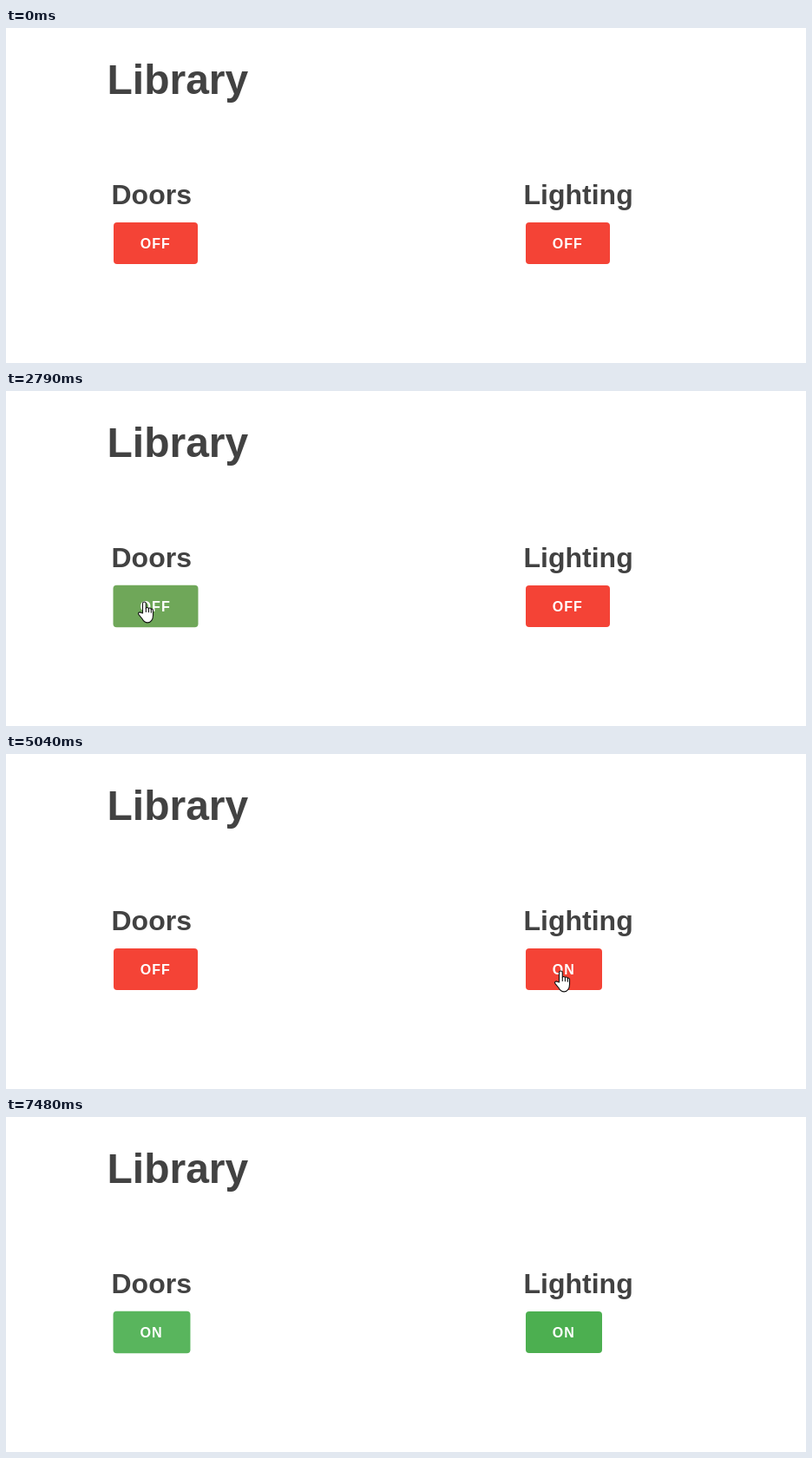
These frames come from a looping animation (922x386 px, 7.56 s). An HTML page:

```html
<!DOCTYPE html>
<html lang="en">
<head>
<meta charset="utf-8">
<title>Library</title>
<style>
  html, body { margin: 0; width: 100%; height: 100%; overflow: hidden; background: #fff; }
  svg { display: block; width: 922px; height: 386px; }
  text { font-family: "Liberation Sans", Arial, sans-serif; font-weight: bold; fill: #424242; }
  .title { font-size: 48px; }
  .heading { font-size: 32px; }
  .label { font-size: 16px; letter-spacing: 1px; fill: #fff; }
  .cursor { fill: #fff; stroke: #111; stroke-width: 1.1; stroke-linejoin: round; stroke-linecap: round; }
</style>
</head>
<body>
<svg viewBox="0 0 922 386">
  <text class="title" x="116.5" y="76">Library</text>
  <text class="heading" x="121.5" y="203">Doors</text>
  <text class="heading" x="596.5" y="203">Lighting</text>
  <g id="doors"><rect x="124" y="224" height="48" rx="4"/><text class="label" x="154.7" y="254"></text></g>
  <g id="lights"><rect x="599" y="224" height="48" rx="4"/><text class="label" x="629.7" y="254"></text></g>
  <g id="hand" class="cursor">
    <path d="M-.5 13.5V2.4a1.9 1.9 0 0 1 3.8 0V8c.2-1.4 2.8-1.4 3.1.3c.3-1.2 2.6-1 2.9.8c.4-1 2.2-.6 2.2 1.2V16c0 4.5-2.4 8.4-6.3 8.4c-3.4 0-4.8-1.7-6.2-4.4L-5.2 14.8c-.9-1.7 1.2-3.2 2.7-1.8z"/>
    <path fill="none" d="M3.3 8v4M6.4 8.3v4M9.3 9.1v3.6"/>
  </g>
  <path id="arrow" class="cursor" d="M.6.8V16.2L4.1 12.9L6.3 18.2L8.7 17.2L6.5 12H11.3Z"/>
</svg>
<script>
const LOOP = 7560;
const RED = [244, 67, 54], GREEN = [76, 175, 80];
const $ = id => document.getElementById(id);

// Button steps: time, label is ON, greenness, hover amount
const tracks = { doors: [[0, false, 0, 0]], lights: [[0, false, 0, 0]] };

function hover(name, ...steps) {
  const track = tracks[name];
  for (const [time, amount] of steps) {
    const [, on, green] = track[track.length - 1];
    track.push([time, on, green, amount]);
  }
}

// A press settles the button, swaps its label, then eases back to the hover look
function click(name, time, mix = 0, lift = 0) {
  const on = !tracks[name][tracks[name].length - 1][1];
  hover(name, [time, .5], [time + 80, 0]);
  tracks[name].push([time + 150, on, on ? mix : 1 - mix, lift], [time + 230, on, +on, 1]);
}

hover('doors', [1460, .5], [1540, .95], [1620, 1]);
click('doors', 1850);
click('doors', 2630, .14, .5);
hover('doors', [3870, .5], [3950, 0]);
hover('lights', [3570, .5], [3650, 1]);
click('lights', 3870);
click('lights', 4420, .14, .5);
click('lights', 4890);
hover('doors', [5750, .5], [5840, 1]);
click('doors', 5920);
hover('lights', [5920, .5], [6000, 0]);
hover('doors', [7480, .53]);

// Pointer steps: time, shape, hotspot
const pointer = [
  [0, ''],
  [1220, 'arrow', 150, 372], [1300, 'arrow', 146, 342], [1380, 'arrow', 147, 308],
  [1460, 'hand', 151, 264], [1540, 'hand', 154, 251.5], [1620, 'hand', 157, 245], [1690, 'hand', 158, 242.5],
  [3100, 'hand', 168, 248], [3180, 'hand', 208, 264], [3260, 'arrow', 290, 280],
  [3340, 'arrow', 390, 287], [3420, 'arrow', 490, 285], [3490, 'arrow', 570, 275],
  [3570, 'hand', 618, 260], [3650, 'hand', 634, 252], [3730, 'hand', 638, 249.5],
  [5210, 'hand', 632, 249], [5290, 'arrow', 590, 250], [5360, 'arrow', 510, 252],
  [5440, 'arrow', 425, 254], [5510, 'arrow', 345, 255], [5590, 'arrow', 281, 255],
  [5670, 'arrow', 240, 253], [5750, 'hand', 200, 251], [5840, 'hand', 179, 251.5],
  [6230, 'arrow', 260, 285], [6310, 'arrow', 430, 325], [6390, 'arrow', 605, 346],
  [6470, 'arrow', 712, 374], [6540, '']
];

const stepAt = (track, time) => track.reduce((last, step) => step[0] <= time ? step : last);

function drawButton(name, time) {
  const [, on, green, lift] = stepAt(tracks[name], time);
  const group = $(name), [box, label] = group.children;
  const width = on ? 88 : 97;
  const cx = +box.getAttribute('x') + width / 2, cy = 248;
  const color = RED.map((c, i) => Math.round(c + (GREEN[i] - c) * green));
  box.setAttribute('width', width);
  box.setAttribute('fill', `rgb(${color})`);
  label.textContent = on ? 'ON' : 'OFF';
  group.setAttribute('opacity', 1 - .15 * lift);
  group.setAttribute('transform', `translate(${cx} ${cy}) scale(${1 + .02 * lift}) translate(${-cx} ${-cy})`);
}

function drawPointer(time) {
  const [, shape, x, y] = stepAt(pointer, time);
  for (const id of ['hand', 'arrow']) {
    $(id).style.display = id === shape ? '' : 'none';
    if (id === shape) $(id).setAttribute('transform', `translate(${x} ${y})`);
  }
}

let start;
function frame(now) {
  start ??= now;
  const time = (now - start) % LOOP;
  drawButton('doors', time);
  drawButton('lights', time);
  drawPointer(time);
  requestAnimationFrame(frame);
}
requestAnimationFrame(frame);
</script>
</body>
</html>
```
